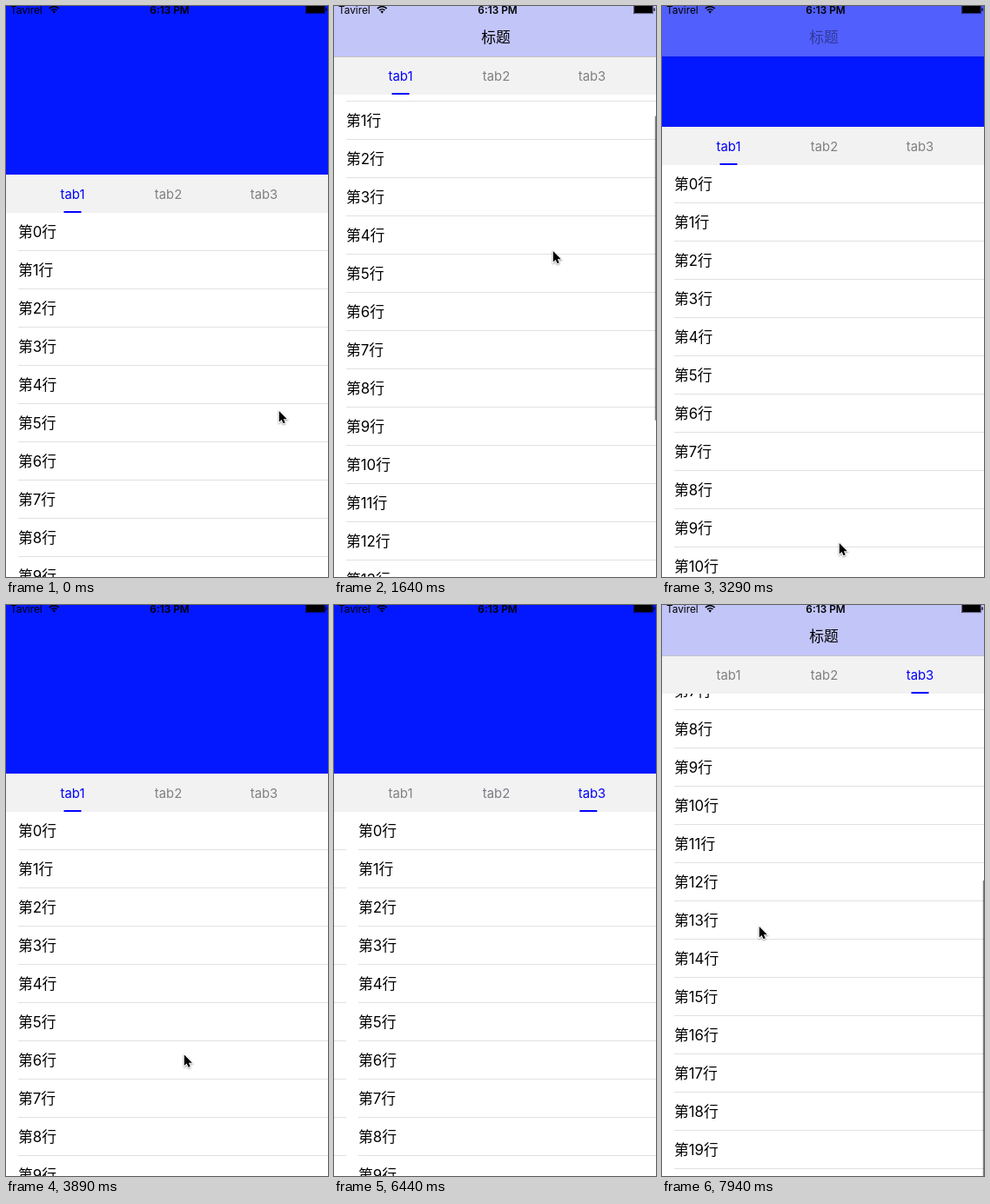
Write an HTML page with a canvas that moves like this. It is 370 by 657 pixels and loops after 8000 ms.

```html
<!DOCTYPE html>
<html lang="zh-CN">
<head>
<meta charset="utf-8">
<title>Tabs</title>
<style>
html, body { margin: 0; width: 100%; height: 100%; overflow: hidden; background: #fff; }
canvas { display: block; }
</style>
</head>
<body>
<canvas id="stage" width="370" height="657"></canvas>
<script>
const c = document.getElementById('stage').getContext('2d');
const W = 370, H = 657, LOOP = 8000;
const ROW = 44, ROWS = 20, NAV = 58, HEAD = 194, BAR = 44;
const FOLD = HEAD - NAV, VIEW = H - NAV - BAR, LIST = ROWS * ROW;
const BLUE = '#0418ff';
const FONT = 'Inter, "Noto Sans CJK SC", "Noto Sans CJK", sans-serif';

// Gestures: time, then the values reached
const scroll = [[290, 0], [1640, 172], [2540, 448], [3500, 0], [6740, 0], [7940, 469]];
const paging = [[4490, 0], [5150, 1], [5690, 1], [6540, 2]];
const pointer = [[290, 313, 465], [1640, 251, 281], [2690, 199, 257], [3290, 203, 617],
  [4490, 205, 416], [4790, 44, 416], [5540, 337, 440], [6440, -19, 430],
  [6890, 118, 600], [7940, 111, 369]];

// Eases from each key to the next
function glide(keys, t) {
  const n = keys.findIndex(k => k[0] > t);
  if (n <= 0) return keys.at(n).slice(1);
  const [t0, ...from] = keys[n - 1], [t1, ...to] = keys[n];
  const p = (t - t0) / (t1 - t0), e = p * p * (3 - 2 * p);
  return from.map((v, i) => v + (to[i] - v) * e);
}

function box(x, y, w, h, color) {
  c.fillStyle = color;
  c.fillRect(x, y, w, h);
}

function text(str, x, y, size, color, align = 'left', weight = 400) {
  c.font = `${weight} ${size}px ${FONT}`;
  c.textAlign = align;
  c.fillStyle = color;
  c.fillText(str, x, y);
}

function rows(x, top) {
  for (let i = 0; i < ROWS; i++) {
    const y = top + i * ROW;
    text(`第${i}行`, x + 14, y + 27.5, 16.8, '#000');
    box(x + 14, y + 43, W - 14, 1, '#e1e1e4');
  }
}

function tabs(top, page) {
  box(0, top, W, BAR, '#f2f2f2');
  for (let i = 0; i < 3; i++) {
    const near = Math.max(0, 1 - Math.abs(page - i));
    const dim = 128 * (1 - near);
    text('tab' + (i + 1), 76.5 + 110 * i, top + 27.5, 14.8,
      `rgb(${dim}, ${dim}, ${128 + 127 * near})`, 'center');
  }
  box(66.5 + 110 * page, top + 42, 20, 2, '#00f');
}

function scrollBar(inner) {
  if (inner <= 0) return;
  const over = Math.max(0, inner - (LIST - VIEW));
  const y = NAV + BAR + 2 + (inner - over) * VIEW / LIST + over;
  box(368.8, y, 2, VIEW * VIEW / LIST - over, 'rgba(0,0,0,.5)');
}

function wave(r, from) {
  c.beginPath();
  c.arc(55.2, 8, r, -Math.PI * .76, -Math.PI * .24);
  if (from) c.arc(55.2, 8, from, -Math.PI * .24, -Math.PI * .76, true);
  else c.lineTo(55.2, 8.8);
  c.fill();
}

function statusBar() {
  text('Tavirel', 5, 8.7, 11.8, '#000');
  text('6:13 PM', 188, 8.7, 11.8, '#000', 'center', 600);
  wave(2.4);
  wave(5.1, 3.5);
  wave(8.1, 6.5);
  c.strokeStyle = '#000';
  c.lineWidth = .5;
  c.strokeRect(344.3, -.8, 22.4, 9.6);
  box(345.1, 0, 20.8, 8, '#000');
  box(367.4, 2.4, 1.3, 3.4, '#000');
}

const arrow = new Path2D('M0 0V14.5L3.3 11.4L5.5 16.4L8 15.3L5.8 10.5H10.4Z');
function drawPointer([x, y]) {
  c.save();
  c.translate(x + .8, y + 1);
  c.scale(.87, .87);
  c.shadowColor = 'rgba(0,0,0,.4)';
  c.shadowBlur = 2;
  c.shadowOffsetY = 1;
  c.lineWidth = 2;
  c.strokeStyle = '#fff';
  c.stroke(arrow);
  c.shadowColor = 'transparent';
  c.fillStyle = '#000';
  c.fill(arrow);
  c.restore();
}

function draw(t) {
  const [s] = glide(scroll, t), [page] = glide(paging, t);
  const top = Math.round(Math.max(NAV, HEAD - s));
  const fade = Math.min(1, s / FOLD);

  box(0, 0, W, H, '#fff');
  for (let i = 0; i < 3; i++) rows(Math.round((i - page) * W), Math.round(HEAD + BAR - s));
  scrollBar(s - FOLD);
  box(0, 0, W, top, BLUE);
  tabs(top, page);

  box(0, 0, W, NAV, `rgba(248,247,247,${.78 * fade})`);
  box(0, NAV, W, 1, `rgba(0,0,0,${.2 * fade})`);
  text('标题', 186, 42, 16.8, `rgba(0,0,0,${fade})`, 'center', 500);
  statusBar();
  drawPointer(glide(pointer, t));
}

// The picture holds for 150 ms at a time
function frame(now) {
  const t = now % LOOP;
  draw(t < 300 ? 0 : Math.floor((t + 10) / 150) * 150 - 10);
  requestAnimationFrame(frame);
}
requestAnimationFrame(frame);
</script>
</body>
</html>
```
